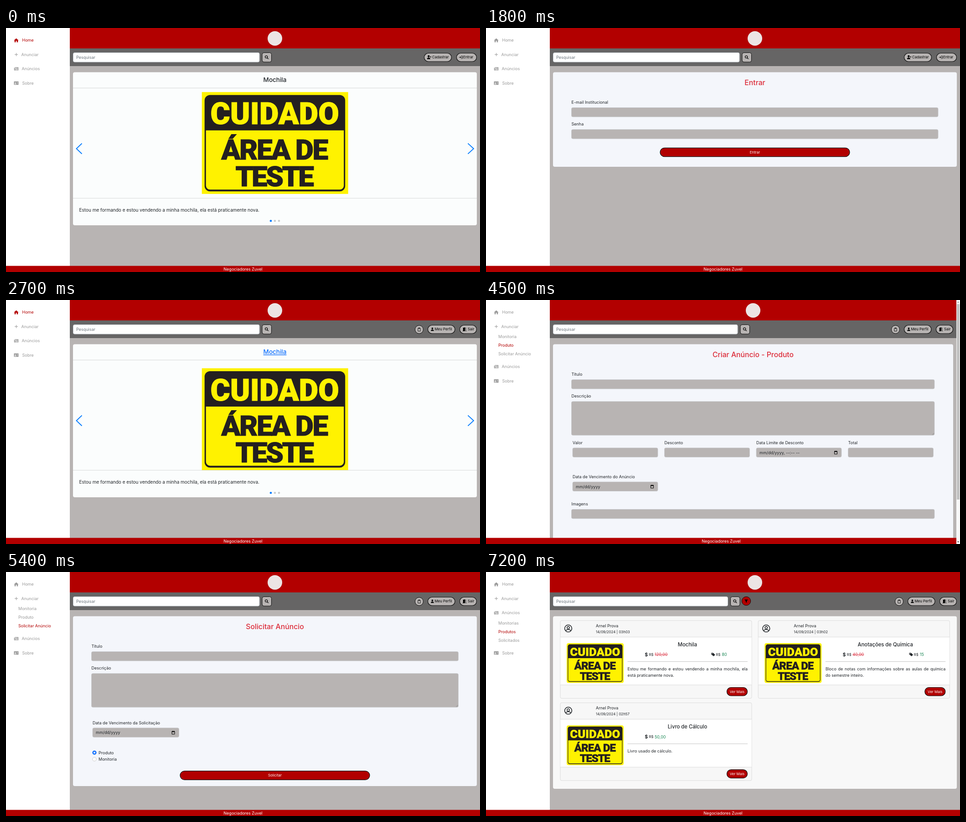
Animation of 1040 by 538 pixels, one loop 8000 ms. Source, as an HTML page:

```html
<!DOCTYPE html>
<html lang="pt-BR">
<head>
<meta charset="utf-8">
<title>Classificados</title>
<style>
html, body { margin: 0; width: 100%; height: 100%; overflow: hidden; background: #b8b4b3; }
svg { display: block; }
#stage { width: 1040px; height: 538px; font-family: Inter, "Liberation Sans", sans-serif; }
p { margin: 0; font: 9px/13.5px Inter, "Liberation Sans", sans-serif; color: #212529; text-align: justify; }
.sign { font-family: Roboto, "Liberation Sans", sans-serif; font-weight: 900; text-anchor: middle; }
</style>
</head>
<body>
<svg id="stage" viewBox="0 0 1040 538"></svg>
<script>
const RED = '#b20000', INK = '#212529', GRAY = '#b8b4b3', MUTED = '#999', BLUE = '#0d6efd';
const BRAND = 'Negociadores Zuvel', PERSON = 'Arnel Prova';

// Icons on a 16 by 16 grid: path and, for outlines, a stroke width
const ICONS = {
  home: ['M8 1L0 8.2h2V15h4.200v-5h3.600v5H14V8.200h2z'],
  plus: ['M8 1v14M1 8h14', 2],
  news: ['M3 2h13v12H2a2 2 0 0 1-2-2V4h2v8h1zM5 4v3h4V4zM5 9v1h9V9zM5 11v1h9v-1zM11 4v1h3V4zM11 6v1h3V6z'],
  card: ['M0 2h16v12H0zM5 5a1.700 1.700 0 1 0 .01 0zM2 12h6c0-3-6-3-6 0zM10 5v1h4V5zM10 8v1h4V8z'],
  search: ['M6.500 1.500a5 5 0 1 0 .01 0zM10.300 10.300L15 15', 2.4],
  userPlus: ['M6 8a3.700 3.700 0 1 0-.01 0zM0 15c0-8 12-8 12 0zM12.700 4h1.400v2H16v1.400h-1.900v2h-1.400v-2h-1.900V6h1.900z'],
  user: ['M8 8a4 4 0 1 0-.01 0zM1 16c0-9 14-9 14 0z'],
  enter: ['M0 8h10M6 4l4 4-4 4M10 2h3a2 2 0 0 1 2 2v8a2 2 0 0 1-2 2h-3', 2],
  door: ['M2 2l8-2v16H0v-1.500h2zM11 2h3v12.500h2V16h-3.500V3.500H11z'],
  clip: ['M3 3h10v12H3zM6 1h4v3H6z', 1.6],
  filter: ['M1 2h14l-5 6.500V15l-4-3V8.500z'],
  tag: ['M0 1h7.500L16 9l-6 6L0 7.500zM3.500 3a1.300 1.300 0 1 0 .01 0z'],
  avatar: ['M8 .9a7.100 7.100 0 1 0 .01 0zM8 4a2.500 2.500 0 1 0 .01 0zM3 13c1.200-4 8.800-4 10 0', 1.4],
  date: ['M2 2.500h12V15H2zM2 4.500h12M5 0v3M11 0v3', 2]
};

const rect = (x, y, x2, y2, fill, r = 0, stroke = 'none', sw = 1) =>
  `<rect x="${x}" y="${y}" width="${x2 - x}" height="${y2 - y}" rx="${r}" fill="${fill}" stroke="${stroke}" stroke-width="${sw}"/>`;
const circle = (x, y, r, fill, stroke = 'none') =>
  `<circle cx="${x}" cy="${y}" r="${r}" fill="${fill}" stroke="${stroke}"/>`;
const line = (d, stroke, sw = 1) => `<path d="${d}" fill="none" stroke="${stroke}" stroke-width="${sw}"/>`;

// y is the middle of the capitals
const text = (x, y, s, size = 9, fill = INK, more = '') =>
  `<text x="${x}" y="${y + size * 0.36}" font-size="${size}" fill="${fill}" ${more}>${s}</text>`;
const MID = 'text-anchor="middle"', MEDIUM = MID + ' font-weight="500"';

function icon(name, x, y, size, color = '#000') {
  const [d, sw] = ICONS[name];
  const paint = sw ? `fill="none" stroke="${color}" stroke-width="${sw}"` : `fill="${color}" fill-rule="evenodd"`;
  return `<path transform="translate(${x - size / 2} ${y - size / 2}) scale(${size / 16})" d="${d}" ${paint}/>`;
}

const pill = (x, x2, y, y2, fill) => rect(x, y, x2, y2, fill, (y2 - y) / 2, '#111', 1.2);

function sign(x, y, w, r = 0) {
  const word = (by, size, gap, s) =>
    `<text x="${160 + gap / 2}" y="${by}" font-size="${size}" letter-spacing="${gap}">${s}</text>`;
  return `<g class="sign" fill="#231f20" transform="translate(${x} ${y}) scale(${w / 321})">` +
    rect(0, 0, 321, 224.5, '#fff200', r) + rect(6, 6.5, 314.5, 219, '#231f20', 12) +
    `<path d="M9 84.500H311.500V206a9 9 0 0 1-9 9H18a9 9 0 0 1-9-9z" fill="#fff200"/>` +
    `<g fill="#fff200" stroke="#fff200">${word(71, 66, 0, 'CUIDADO')}</g>` +
    `<g stroke="#231f20">${word(148.5, 62, -2.5, 'ÁREA DE')}${word(207.5, 62, -3.5, 'TESTE')}</g></g>`;
}

function sidebar({ active, open, subs = [] }) {
  const items = [['Home', 'home', 35.5, 10], ['Anunciar', 'plus', 33.5, 8],
    ['Anúncios', 'news', 34.5, 9.5], ['Sobre', 'card', 35.5, 10]];
  let y = 27, out = rect(0, 0, 140, 538, '#fff');
  for (const [name, pic, x, size] of items) {
    const color = name === active ? RED : MUTED;
    out += icon(pic, 22.5, y, size, color) + text(x, y, name, 9, color);
    if (name === open) {
      subs.forEach((s, i) => out += text(27, y + 22.5 + 19 * i, s, 9, s === active ? RED : MUTED));
      y += 57;
    }
    y += 31.5;
  }
  return out;
}

function header(W, { user, filter }) {
  const end = filter ? 530.5 : W === 1040 ? 556 : 552, y = 64.5;
  let out = rect(140, 0, W, 45, RED) + circle((140 + W) / 2, 23, 16, '#ece4e4') +
    rect(140, 45, W, 84, '#666565') +
    rect(147.5, 54.5, end, 75, '#fff', 3, '#ced4da') + text(154, y, 'Pesquisar', 9, '#6c757d') +
    rect(end + 6, 54.5, end + 26.5, 75, GRAY, 4, '#111') + icon('search', end + 16, y, 8.5);
  if (filter) out += circle(571, 64, 9.7, RED, '#111') + icon('filter', 571, 64, 8.5);
  const button = (x, x2, pic, ix, size, label, tx) =>
    pill(W - x, W - x2, 55.5, 74, GRAY) + icon(pic, W - ix, y, size) + text(W - tx, y, label, 7.88, '#000');
  return out + (user
    ? circle(W - 133.5, 65, 9, GRAY, '#111') + icon('clip', W - 133.5, 65, 8.5) +
      button(114.5, 55, 'user', 104.5, 7.5, 'Meu Perfil', 99.5) + button(44.5, 7.5, 'door', 34, 8.5, 'Sair', 27)
    : button(122.5, 62.5, 'userPlus', 111.5, 9.5, 'Cadastrar', 105) + button(51.5, 7.5, 'enter', 42, 8, 'Entrar', 37));
}

const scrollbar = end => rect(1032, 0, 1040, 538, '#f8f8f8') + rect(1033, 9, 1039, end, '#c1c1c1') +
  '<path d="M1034 6l2-3 2 3z" fill="#999"/><path d="M1034 532l2 3 2-3z" fill="#505050"/>';

const panel = (W, bottom, fill) => rect(147, 97.5, W - 7, bottom, fill, 4);

// Labelled form field; kind: date, select, area
function field(x, x2, y, label, kind = '', value = '') {
  const h = kind === 'area' ? 74.5 : 20.5, mid = y + 21.8;
  let out = text(x, y, label) + rect(x, y + 11.5, x2, y + 11.5 + h, GRAY, 3, '#c9ccd0', 0.8);
  if (value) out += text(x + 7, mid, value);
  if (kind === 'date') out += icon('date', x2 - 12.5, mid, 8);
  if (kind === 'select') out += line(`M${x2 - 14.5} ${mid - 1.5}l3 3 3-3`, INK, 1.1);
  if (kind === 'area') out += line(`M${x2 - 5} ${y + 85}l4-4m-2 4l2-2`, '#777', 0.6);
  return out;
}

function submit(W, y, label) {
  const mid = (140 + W) / 2, half = W === 1040 ? 208 : 206;
  return pill(mid - half, mid + half, y - 9.7, y + 9.7, RED) + text(mid, y, label, 7.88, '#fff', MID);
}

const form = (W, bottom, title, body) => panel(W, bottom, '#f4f6fb') +
  text((140 + W) / 2, 120, title, 15.75, '#dc2b38', MEDIUM) + body;

const DATE = 'mm/dd/yyyy';

function home(user) {
  return panel(1040, 435, '#fbfdfd') +
    text(590, 114.5, 'Mochila', 13.5, user ? BLUE : INK, MEDIUM + (user ? ' text-decoration="underline"' : '')) +
    line('M147 132.300H1033M147 375.300H1033', '#d5d7d7') + sign(429.7, user ? 150.5 : 141.3, 321) +
    line('M166.500 254.500L154.500 266l12 11.500M1013.500 254.500L1026 266l-12.500 11.500', '#007aff', 1.8) +
    text(160.5, 401.3, 'Estou me formando e estou vendendo a minha mochila, ela está praticamente nova.', 10) +
    [581, 590, 599].map((x, i) => circle(x, 425.3, 2.3, i ? '#c9cbcb' : '#007aff')).join('');
}

function signUp() {
  const rows = [['Nome'], ['Data de Nascimento', 'date', DATE], ['Telefone'],
    ['Instituição', 'select', 'Selecione sua Zuvel'], ['E-mail Institucional'], ['Senha'], ['Confirmar Senha']];
  return form(1032, 538, 'Criar Conta',
    rows.map((row, i) => field(187.5, 984, 164 + 48.25 * i, ...row)).join('') +
    text(270.3, 357.5, '(@zuvel.edu.test)', 7.1, '#6c757d') + submit(1032, 505, 'Cadastrar'));
}

const signIn = () => form(1040, 306, 'Entrar', field(187.5, 992, 164, 'E-mail Institucional') +
  field(187.5, 992, 212.2, 'Senha') + submit(1040, 274, 'Entrar'));

const intro = end => field(187.5, end, 164, 'Título') + field(187.5, end, 212.2, 'Descrição', 'area');

function advert(kind) {
  const tutor = kind === 'Monitoria', y = tutor ? 362.7 : 314.5;
  const cells = [['Valor'], ['Desconto'], ['Data Limite de Desconto', 'date', DATE + ', --:-- --'], ['Total']];
  return form(1032, 538, 'Criar Anúncio - ' + kind, intro(984) +
    (tutor ? field(187.5, 984, 314.5, 'Matéria') : '') +
    cells.map((c, i) => field(190 + 201.5 * i, 377 + 201.5 * i, y, ...c)).join('') +
    field(190, 377, y + 75, 'Data de Vencimento do Anúncio', 'date', DATE) +
    (tutor ? text(187.5, 512.7, 'Horários disponíveis', 9, '#111', 'font-weight="600"')
      : field(187.5, 984, 450, 'Imagens')));
}

const request = () => form(1040, 472, 'Solicitar Anúncio', intro(992.5) +
  field(190, 379.5, 332.3, 'Data de Vencimento da Solicitação', 'date', DATE) +
  circle(194, 398.3, 4.5, BLUE) + circle(194, 398.3, 2, '#fff') + text(203, 398.5, 'Produto') +
  circle(194, 412.8, 4.2, '#fff', '#ccc') + text(203, 413, 'Monitoria') + submit(1040, 448.5, 'Solicitar'));

function adCard(i, h, [hour, title, price, sale, about]) {
  const old = sale ? 'text-decoration="line-through"' : '', foot = 107 + h - 29.5;
  return `<g transform="translate(${i % 2 * 434.3} ${i > 1 ? h + 9.8 : 0})">` +
    rect(163, 107, 583, 107 + h, '#f7f7f7', 3, '#dcdcdc') + rect(163.5, 143.5, 582.5, foot, '#fff') +
    line(`M163 143.300H583M163 ${foot}H583`, '#dcdcdc') + icon('avatar', 180.5, 124.5, 17.5, INK) +
    text(241, 118.5, PERSON) + text(241, 132.3, '14/09/2024 | ' + hour, 7.88) +
    sign(177, 157, 125, 10) + text(442, 159.5, title, 11.25, INK, MEDIUM) +
    text(348.5, 182, '$', 10, INK, 'font-weight="700"') + text(357.5, 182, 'R$', 7.88) +
    text(370, 182, price, 9, sale ? '#dc3545' : '#198754', old) +
    (sale ? icon('tag', 498.5, 182, 8.5, INK) + text(504.5, 182, 'R$', 7.88) + text(517.5, 182, sale, 9, '#198754') : '') +
    line('M310.500 197.500H574', '#c4c4c4') +
    `<foreignObject x="310.500" y="207" width="263.500" height="40"><p>${about}</p></foreignObject>` +
    pill(528.5, 573.5, foot + 5.5, foot + 24, RED) + text(551, foot + 14.8, 'Ver Mais', 7.88, '#fff', MID) + '</g>';
}

const list = (bottom, h, ads) => panel(1040, bottom, '#f8f8f8') + ads.map((ad, i) => adCard(i, h, ad)).join('');

const products = [
  ['03h03', 'Mochila', '120,00', '80', 'Estou me formando e estou vendendo a minha mochila, ela está praticamente nova.'],
  ['03h02', 'Anotações de Química', '40,00', '15', 'Bloco de notas com informações sobre as aulas de química do semestre inteiro.'],
  ['02h57', 'Livro de Cálculo', '50,00', '', 'Livro usado de cálculo.']
];
const lessons = [
  ['03h01', 'Monitoria de Química', '40,00', '15', 'Aulas de química do semestre inteiro.'],
  ['02h59', 'Monitoria de Cálculo', '50,00', '', 'Aulas de cálculo.']
];

const post = { open: 'Anunciar', subs: ['Monitoria', 'Produto', 'Solicitar Anúncio'], user: true };
const browse = { open: 'Anúncios', subs: ['Monitorias', 'Produtos', 'Solicitados'], user: true, filter: true };

const pages = [
  { active: 'Home', body: home(false) },
  { scroll: 514, body: signUp() },
  { body: signIn() },
  { active: 'Home', user: true, body: home(true) },
  { ...post, active: 'Monitoria', scroll: 410, body: advert('Monitoria') },
  { ...post, active: 'Produto', scroll: 440, body: advert('Produto') },
  { ...post, active: 'Solicitar Anúncio', body: request() },
  { ...browse, active: 'Monitorias', body: list(493, 179.5, lessons) },
  { ...browse, active: 'Produtos', body: list(478, 171.5, products) }
];

function draw(page) {
  const W = page.scroll ? 1032 : 1040;
  return rect(0, 0, 1040, 538, GRAY) + sidebar(page) + header(W, page) + page.body +
    rect(0, 524.5, W, 538, RED) + text(W / 2, 531.5, BRAND, 9, '#fff', MID) +
    (page.scroll ? scrollbar(page.scroll) : '');
}

const stage = document.getElementById('stage');
const start = performance.now();
let shown = -1;

function tick() {
  const time = (performance.now() - start) % 8000;
  const index = Math.floor(time / 900);
  if (index !== shown) {
    shown = index;
    stage.innerHTML = draw(pages[index]);
  }
  requestAnimationFrame(tick);
}
tick();
</script>
</body>
</html>
```
